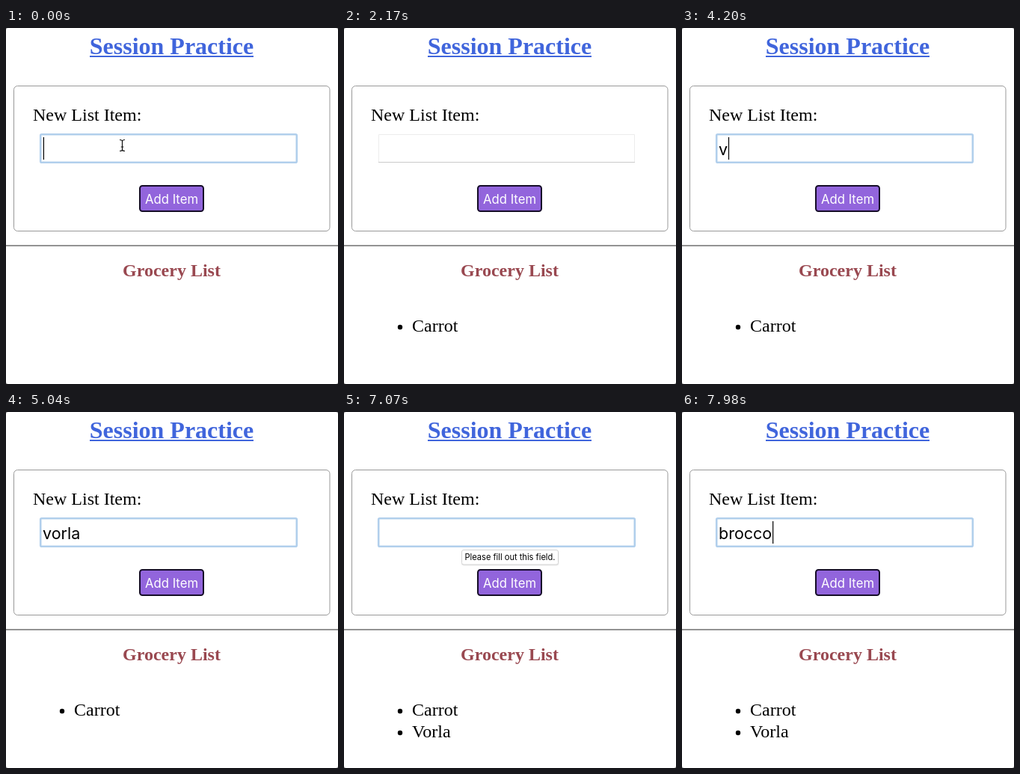
An HTML page that plays this animation: 444x476 px, repeating every 8000 ms.

```html
<!DOCTYPE html>
<html lang="en">
<head>
<meta charset="utf-8">
<title>Session Practice</title>
<style>
  html, body { margin: 0; width: 100%; height: 100%; overflow: hidden; background: #fff; }
  svg { display: block; width: 444px; height: 476px; }
  .serif { font-family: "Liberation Serif", "Times New Roman", serif; font-size: 24px; }
  .bold { font-weight: 700; }
  .sans { font-family: Inter, Roboto, sans-serif; }
  .mid { text-anchor: middle; }
</style>
</head>
<body>
<svg viewBox="0 0 444 476">
  <rect width="444" height="476" fill="#fff"/>
  <path d="M0 474V476H2ZM444 474V476H442ZM0 2V0H2ZM444 2V0H442Z" fill="#999"/>

  <g fill="#4065dc">
    <text class="serif bold mid" x="221.5" y="35" style="font-size:32px">Session Practice</text>
    <rect x="112" y="37" width="219" height="2"/>
  </g>

  <rect x="10.5" y="77.5" width="422.5" height="194" rx="5" fill="none" stroke="#999"/>
  <text class="serif" x="36" y="124">New List Item:</text>

  <g id="idle" fill="none">
    <path d="M46.5 180V142.5H388.5V180" stroke="#ececec"/>
    <path d="M46 179.5H389" stroke="#cbcbcb"/>
  </g>
  <rect id="focus" x="46.2" y="142.2" width="342.6" height="37.6" rx="1.5" fill="#fff" stroke="#b1cfec" stroke-width="2.6"/>
  <text id="field" class="sans" x="49" y="170" font-size="21.5"></text>
  <rect id="caret" y="146" width="1.2" height="30"/>

  <rect x="179" y="211" width="85" height="34" rx="3.5" fill="#9265dc" stroke="#150c28" stroke-width="2"/>
  <text class="sans mid" x="221.5" y="235" font-size="16.7" fill="#fff">Add Item</text>

  <rect y="290.3" width="444" height="1.4" fill="#666"/>
  <text class="serif bold mid" x="221.5" y="332" fill="#994850">Grocery List</text>
  <g id="list"></g>

  <g id="tip">
    <rect x="157" y="185.5" width="130.5" height="20" rx="3" fill="#000" opacity=".08"/>
    <rect x="157.5" y="184.5" width="129" height="19.5" rx="2.5" fill="#fff" stroke="#d4d4d4"/>
    <text class="sans mid" x="222" y="198" font-size="11.1">Please fill out this field.</text>
  </g>

  <g id="mouse" fill="none" stroke="#111">
    <circle id="ring" r="15" stroke="#000" stroke-width="2.5"/>
    <path d="M-3.5 -7.5Q0 -7.5 0 -5.5Q0 -7.5 3.5 -7.5M0 -6V6M-3.5 7.5Q0 7.5 0 5.5Q0 7.5 3.5 7.5M-1.8 2H1.8" stroke-width="1.2"/>
  </g>
</svg>
<script>
const LOOP = 8000, TICK = 70;
const $ = id => document.getElementById(id);
const [idle, focus, field, caret, list, tip, mouse, ring] =
  ["idle", "focus", "field", "caret", "list", "tip", "mouse", "ring"].map($);

// Each word: key times, then the moment the field is cleared.
const words = [
  { text: "carrot", keys: [560, 700, 840, 980, 1120, 1400], end: 1680 },
  { text: "vorla", keys: [4130, 4270, 4410, 4550, 4760], end: 5110 },
  { text: "broccoli", keys: [7210, 7350, 7490, 7630, 7770, 7980], end: LOOP }
];
const items = [["Carrot", 1680], ["Vorla", 5110]];
const focusSpans = [[0, 1680], [3710, 5110], [6090, LOOP]];
const caretOff = [[1540, 1680], [4970, 5110], [6650, 7210]];
const presses = [[3710, 3780], [6090, 6230]];
// Pointer glides: visible span, travel time, start and end points.
const glides = [
  { span: [0, 560], travel: 1, from: [155.5, 157], to: [155.5, 157] },
  { span: [2940, 4130], travel: 350, from: [143, 148], to: [154.5, 159] },
  { span: [5810, 6790], travel: 280, from: [154.5, 159], to: [158, 164] }
];

const within = (t, [a, b]) => t >= a && t < b;
const any = (t, spans) => spans.some(s => within(t, s));
const show = (el, on) => el.setAttribute("visibility", on ? "visible" : "hidden");
const clamp = v => Math.max(0, Math.min(1, v));

list.innerHTML = items.map(([name], i) =>
  `<g><circle cx="75" cy="${400 + 29 * i}" r="3.2"/>` +
  `<text class="serif" x="91" y="${406 + 29 * i}">${name}</text></g>`).join("");

function typed(t) {
  const word = words.find(w => within(t, [w.keys[0], w.end]));
  return word ? word.text.slice(0, word.keys.filter(k => k <= t).length) : "";
}

function movePointer(t) {
  const glide = glides.find(g => within(t, g.span));
  show(mouse, glide);
  show(ring, glide && any(t, presses));
  if (!glide) return;
  const p = clamp((t - glide.span[0]) / glide.travel);
  const ease = 1 - (1 - p) ** 2;
  const [x, y] = glide.from.map((a, i) => a + (glide.to[i] - a) * ease);
  mouse.setAttribute("transform", `translate(${x} ${y})`);
}

function render(now) {
  const time = now % LOOP;
  const t = Math.floor(time / TICK) * TICK;
  const focused = any(t, focusSpans);
  const text = typed(t);
  if (field.textContent !== text) field.textContent = text;
  show(idle, !focused);
  show(focus, focused);
  show(caret, focused && !any(t, caretOff));
  caret.setAttribute("x", 49.8 + (text ? field.getComputedTextLength() : 0));
  items.forEach(([, from], i) => show(list.children[i], t >= from));
  tip.setAttribute("opacity", clamp((t - 6790) / 140) * clamp((7280 - t) / 140));
  movePointer(t);
}

function loop() {
  render(performance.now());
  requestAnimationFrame(loop);
}
loop();
</script>
</body>
</html>
```
